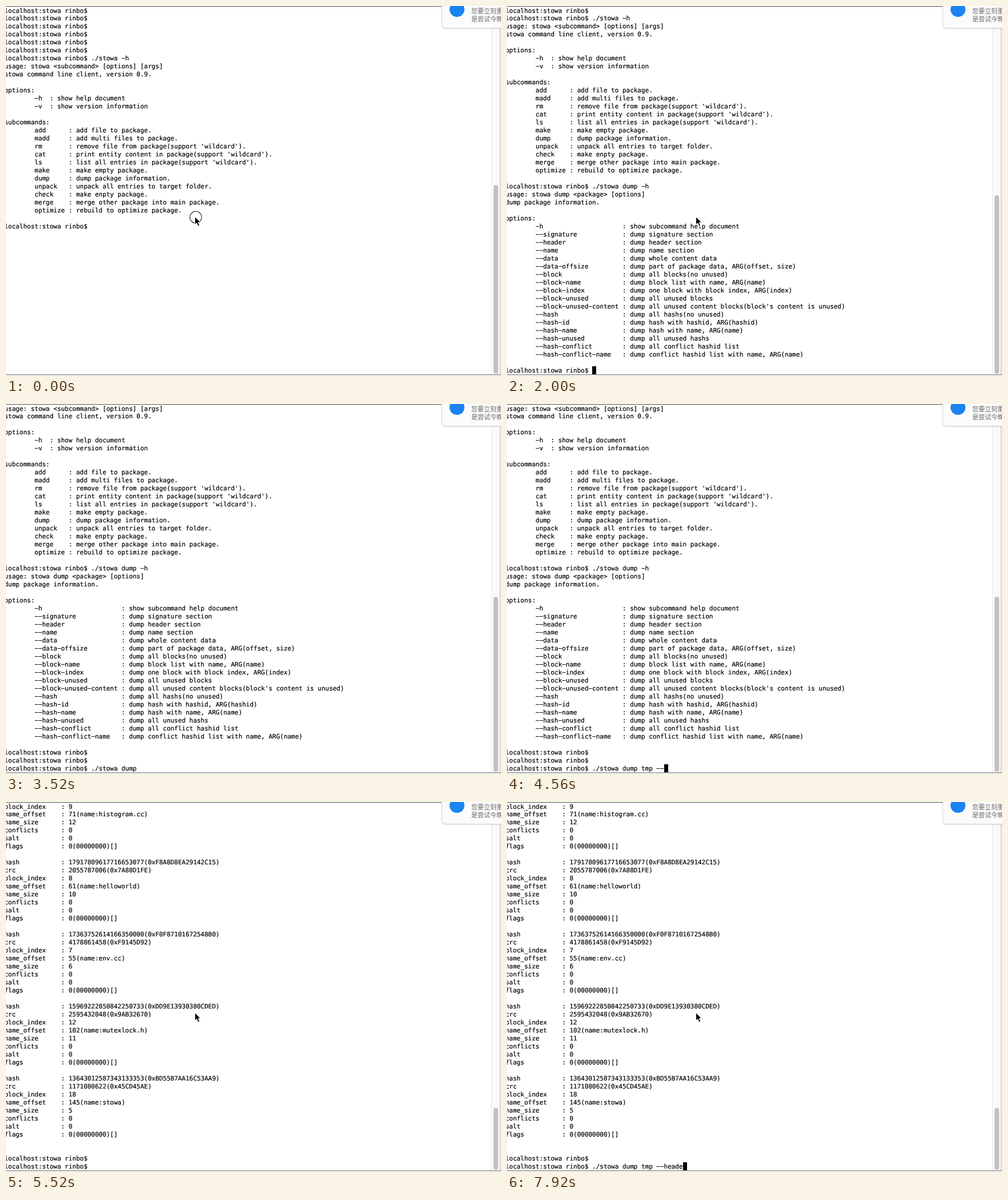
An HTML page for the animation above (8 s loop, 866x647 px).

```html
<!DOCTYPE html>
<html lang="en">
<head>
<meta charset="utf-8">
<title>Terminal session</title>
<style>
  html, body { margin: 0; width: 100%; height: 100%; overflow: hidden; background: #fff; }
  #stage { position: relative; width: 866px; height: 647px; overflow: hidden; background: #fff; }
  #stage > * { position: absolute; }
  #screen {
    margin: 0; left: -2.8px; top: 1.5px; color: #000;
    font: 10.97px/13.98px "DejaVu Sans Mono", monospace;
    -webkit-text-stroke: .2px #000;
    text-rendering: geometricPrecision; white-space: pre;
  }
  #caret { width: 7px; height: 14px; background: #000; }
  #top { left: 0; top: 0; width: 866px; height: 1px; background: #4c4c4c; }
  #bottom { left: 0; top: 644px; width: 866px; height: 1px; background: #808080; }
  #below { left: 0; top: 645px; width: 866px; height: 2px; background: #e9e9e9; }
  #track {
    left: 849px; top: 1px; width: 14px; height: 643px;
    background: #fafafa; border-left: 1px solid #e8e8e8;
  }
  #edge { left: 864px; top: 0; width: 1px; height: 645px; background: #b4b4b4; }
  #thumb { left: 853px; width: 8px; border-radius: 4px; background: #c1c1c1; }
  #note {
    left: 762px; top: -20px; width: 130px; height: 59px; border-radius: 7px;
    background: #fbfbfb; border: 1px solid #d8d8d8; box-sizing: border-box;
    box-shadow: 0 1px 2px rgba(0, 0, 0, .14);
  }
  #badge { left: 776px; top: -7px; width: 26px; height: 26px; border-radius: 50%; background: #1b83f2; }
  #msg {
    left: 814px; top: 1px; color: #6a6a6a; white-space: pre;
    font: 11px/14px "Noto Sans CJK SC", "Noto Sans CJK", sans-serif;
  }
  #mouse { left: 310px; top: 350px; }
</style>
</head>
<body>
<div id="stage">
  <pre id="screen"></pre>
  <div id="caret"></div>
  <div id="top"></div>
  <div id="below"></div>
  <div id="track"></div>
  <div id="edge"></div>
  <div id="thumb"></div>
  <div id="bottom"></div>
  <div id="note"></div>
  <div id="badge"></div>
  <div id="msg">您要立刻重
是尝试今晚</div>
  <svg id="mouse" width="44" height="44">
    <circle id="ring" cx="22" cy="19.3" r="10.3" fill="none" stroke="#222" stroke-width="1.1"/>
    <path d="M20.5 18.5V32.5L23.7 29.5L26 35L28.6 33.9L26.3 28.5H30.5Z"
      fill="#000" stroke="#fff" stroke-width="1" stroke-linejoin="round"/>
  </svg>
</div>
<script>
const LOOP = 8000, ROWS = 46, CELL_W = 6.604, CELL_H = 13.98, LEFT = -2.8, KEY = 80;
const $ = id => document.getElementById(id);
const PROMPT = 'localhost:stowa rinbo$ ';
const pad = ' '.repeat(8);
const table = (width, rows) => rows.map(([k, v]) => pad + k.padEnd(width) + ': ' + v).join('\n');

const mainHelp = `usage: stowa <subcommand> [options] [args]
stowa command line client, version 0.9.

options:
${table(4, [['-h', 'show help document'], ['-v', 'show version information']])}

subcommands:
${table(9, [
  ['add', 'add file to package.'],
  ['madd', 'add multi files to package.'],
  ['rm', "remove file from package(support 'wildcard')."],
  ['cat', "print entity content in package(support 'wildcard')."],
  ['ls', "list all entries in package(support 'wildcard')."],
  ['make', 'make empty package.'],
  ['dump', 'dump package information.'],
  ['unpack', 'unpack all entries to target folder.'],
  ['check', 'make enpty package.'],
  ['merge', 'merge other package into main package.'],
  ['optimize', 'rebuild to optimize package.']
])}

`;

const dumpHelp = `usage: stowa dump <package> [options]
dump package information.

options:
${table(23, [
  ['-h', 'show subcommand help document'],
  ['--signature', 'dump signature section'],
  ['--header', 'dump header section'],
  ['--name', 'dump name section'],
  ['--data', 'dump whole content data'],
  ['--data-offsize', 'dump part of package data, ARG(offset, size)'],
  ['--block', 'dump all blocks(no unused)'],
  ['--block-name', 'dump block list with name, ARG(name)'],
  ['--block-index', 'dump one block with block index, ARG(index)'],
  ['--block-unused', 'dump all unused blocks'],
  ['--block-unused-content', "dump all unused content blocks(block's content is unused)"],
  ['--hash', 'dump all hashs(no unused)'],
  ['--hash-id', 'dump hash with hashid, ARG(hashid)'],
  ['--hash-name', 'dump hash with name, ARG(name)'],
  ['--hash-unused', 'dump all unused hashs'],
  ['--hash-conflict', 'dump all conflict hashid list'],
  ['--hash-conflict-name', 'dump conflict hashid list with name, ARG(name)']
])}

`;

const record = ([hash, crc, index, offset, name]) => [
  ['hash', hash], ['crc', crc], ['block_index', index],
  ['name_offset', `${offset}(name:${name})`], ['name_size', name.length],
  ['conflicts', 0], ['salt', 0], ['flags', '0(00000000)[]']
].map(([k, v]) => k.padEnd(15) + ': ' + v).join('\n') + '\n\n';

const hashDump = [
  ['18014398509481984000(0xFA00000000000000)', '2066500880(0x7B2C4D10)', 9, 71, 'histogram.cc'],
  ['17917809617716653077(0xF8A8D8EA29142C15)', '2055787006(0x7A88D1FE)', 8, 61, 'helloworld'],
  ['17363752614166350000(0xF0F87101672548B0)', '4178861458(0xF9145D92)', 7, 55, 'env.cc'],
  ['15969222850842250733(0xDD9E13930380CDED)', '2595432048(0x9AB32670)', 12, 102, 'mutexlock.h'],
  ['13643012587343133353(0xBD55B7AA16C53AA9)', '1171080622(0x45CD45AE)', 18, 145, 'stowa']
].map(record).join('') + '\n';

// [start, text, printed at once]; otherwise one key per KEY ms
const script = [
  [0, (PROMPT + '\n').repeat(6) + PROMPT + './stowa -h\n' + mainHelp + PROMPT, true],
  [160, './stowa '],
  [960, 'dump '],
  [1520, '-h'],
  [1920, '\n' + dumpHelp + PROMPT, true],
  [2240, '\n' + PROMPT, true],
  [2400, '\n' + PROMPT, true],
  [2560, './'],
  [2800, 'stowa dump'],
  [4080, ' tmp '],
  [4480, '--hash'],
  [4960, '\n', true],
  [5120, hashDump + PROMPT, true],
  [5440, '\n' + PROMPT, true],
  [5600, './stowa '],
  [6240, 'dump tmp '],
  [7200, '--heade']
];
const thumbTops = [[0, 313], [1920, 331], [2240, 334], [2400, 337], [4960, 340], [5120, 535]];
const caretOn = [[160, 720], [1440, 2080], [2720, 3360], [4000, 4640], [5120, 5440], [6480, 7040], [7440, 8000]];
const mouseOn = [[0, 240], [1920, 2240], [4960, 8000]];

const during = (spans, t) => spans.some(([a, b]) => t >= a && t < b);
const show = (el, on) => { el.style.visibility = on ? 'visible' : 'hidden'; };

function logAt(t) {
  let out = '';
  for (const [start, text, whole] of script) {
    if (t < start) break;
    out += whole ? text : text.slice(0, Math.floor((t - start) / KEY) + 1);
  }
  return out;
}

let shown = '';
function draw(t) {
  const rows = logAt(t).split('\n').slice(-ROWS);
  // the terminal's hyphens are as wide as a minus sign
  const view = rows.join('\n').replace(/-/g, '\u2212');
  if (view !== shown) $('screen').textContent = shown = view;

  const caret = $('caret').style;
  caret.left = rows[rows.length - 1].length * CELL_W + LEFT + 'px';
  caret.top = Math.round((rows.length - 1) * CELL_H + 0.8) + 'px';
  show($('caret'), during(caretOn, t));

  const top = thumbTops.filter(([at]) => at <= t).pop()[1];
  $('thumb').style.top = top + 'px';
  $('thumb').style.height = 643 - top + 'px';

  show($('mouse'), during(mouseOn, t));
  $('ring').style.display = t < 160 ? '' : 'none';
}

const begin = performance.now();
function tick() {
  draw((performance.now() - begin) % LOOP);
  requestAnimationFrame(tick);
}
draw(0);
requestAnimationFrame(tick);
</script>
</body>
</html>
```
